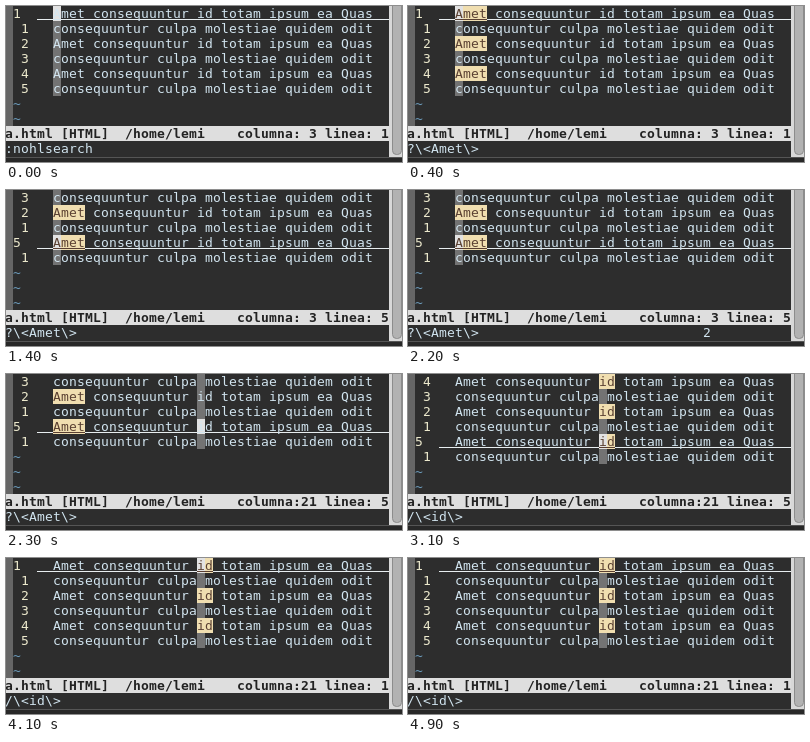
An HTML page with a canvas for the animation above (5100 ms loop, 396 by 156 pixels).

```html
<!DOCTYPE html>
<html lang="es">
<head>
<meta charset="utf-8">
<title>Word search in a text editor</title>
<style>
  html, body { margin: 0; width: 100%; height: 100%; overflow: hidden; background: #2d2d2d; }
  canvas { display: block; }
</style>
</head>
<body>
<canvas width="396" height="156"></canvas>
<script>
const ctx = document.querySelector('canvas').getContext('2d');
const CELL = 8, ROW = 15, LEFT = -1, TEXT_COL = 6, COLS = 48;
const FONT = '13px "DejaVu Sans Mono", monospace';
const color = {
  bg: '#2d2d2d', text: '#d2e5f0', number: '#ebe8cc', tilde: '#6d9dbd',
  gutter: '#666666', column: '#737373', cursor: '#e2e2e2', rule: '#e8eef0',
  match: '#f0deb0', matchText: '#5a4032', status: '#dedede', statusText: '#222222'
};
const sentences = [
  'Amet consequuntur id totam ipsum ea Quas',
  'consequuntur culpa molestiae quidem odit'
];
const LINES = 6, BUFFER_ROWS = 8, LOOP = 5100;

// Each step changes only the listed parts of the editor state.
const steps = [
  { at: 0, line: 1, top: 1, col: 0, word: '', command: ':nohlsearch', pending: '', cursor: true },
  { at: 400, word: 'Amet', command: '?\\<Amet\\>' },
  { at: 1000, line: 3 },
  { at: 1400, line: 5, top: 2 },
  { at: 2200, pending: '2' },
  { at: 2300, pending: '', col: 18 },
  { at: 3100, top: 1, word: 'id', command: '/\\<id\\>' },
  { at: 3700, line: 3 },
  { at: 4100, line: 1 },
  { at: 4900, cursor: false }
];

const cellX = col => LEFT + col * CELL;

function box(x, y, w, h, fill) {
  ctx.fillStyle = fill;
  ctx.fillRect(x, y, w, h);
}

function write(text, col, row, fill, bold = false) {
  ctx.font = (bold ? 'bold ' : '') + FONT;
  ctx.fillStyle = fill;
  [...text].forEach((char, i) => ctx.fillText(char, cellX(col + i), row * ROW + 12));
}

function drawLine(state, number, row) {
  const text = sentences[(number - 1) % 2];
  const y = row * ROW;
  const current = number === state.line;
  const start = state.word ? text.split(' ').indexOf(state.word) < 0 ? -1 : text.indexOf(state.word) : -1;

  write(String(current ? number : Math.abs(number - state.line)), current ? 1 : 2, row, color.number);
  if (current) box(cellX(4), y + 13, (COLS - 4) * CELL, 1, color.rule);

  [...text].forEach((char, i) => {
    const matched = start >= 0 && i >= start && i < start + state.word.length;
    const x = cellX(TEXT_COL + i);
    const ink = matched ? color.matchText : color.text;
    let fill = matched ? color.match : null;
    if (i === state.col) {
      if (current) fill = state.cursor ? color.cursor : fill;
      else if (!matched) fill = color.column;
    }
    if (fill) {
      box(x, y, CELL, ROW, fill);
      if (current) box(x, y + 13, CELL, 1, ink);
    }
    write(char, TEXT_COL + i, row, ink);
  });
}

function drawFrame() {
  box(383, 0, 13, 151, '#d8d8d8');
  ctx.fillStyle = '#b2b2b2';
  ctx.strokeStyle = '#8c8c8c';
  ctx.lineWidth = 1;
  ctx.beginPath();
  ctx.roundRect(386.5, -6.5, 9, 155, 4);
  ctx.fill();
  ctx.stroke();
  box(0, 151, 396, 1, '#555555');
  box(0, 152, 396, 4, '#282828');
}

function draw(state) {
  box(0, 0, 396, 156, color.bg);
  box(0, 0, 7, BUFFER_ROWS * ROW, color.gutter);
  for (let row = 0; row < BUFFER_ROWS; row++) {
    const number = state.top + row;
    if (number <= LINES) drawLine(state, number, row);
    else write('~', 1, row, color.tilde);
  }
  box(0, 120, 383, ROW, color.status);
  const column = String(state.col + 3).padStart(2);
  write(`a.html [HTML]  /home/lemi    columna:${column} linea: ${state.line}`, 0, 8, color.statusText, true);
  write(state.command, 0, 9, color.text);
  write(state.pending, 37, 9, color.text);
  drawFrame();
}

function tick() {
  const time = performance.now() % LOOP;
  draw(Object.assign({}, ...steps.filter(step => step.at <= time)));
  requestAnimationFrame(tick);
}
tick();
</script>
</body>
</html>
```
